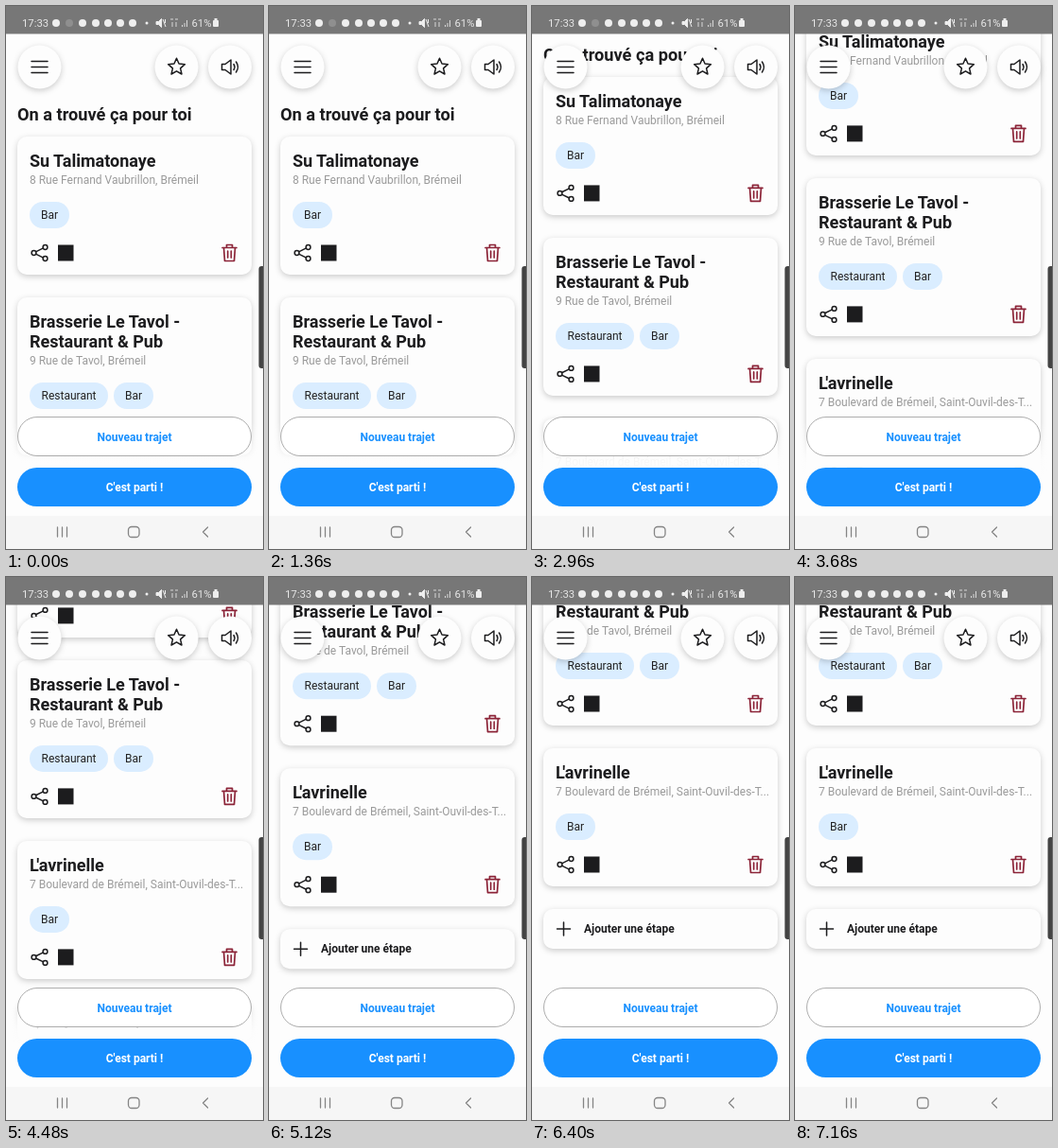
Recreate the animation shown at these times as an HTML page. Size 272 by 574 pixels, loop 7760 ms.

```html
<!DOCTYPE html>
<html lang="fr">
<head>
<meta charset="utf-8">
<style>
  html, body { margin: 0; width: 100%; height: 100%; overflow: hidden; background: #fdfdfd; }
  svg { display: block; width: 100%; height: 100%; font: 12px Roboto, sans-serif; }
  .title { font-size: 18px; font-weight: 700; fill: #1c1c1e; }
  .heading { font-size: 18.2px; }
  .address { fill: #9a9a9a; }
  .bold { font-weight: 700; }
  .raised { fill: #fdfdfd; filter: drop-shadow(0 2.5px 3px #0003); }
  .line { fill: none; stroke: #1c1c1e; stroke-width: 1.5; stroke-linejoin: round; stroke-linecap: round; }
  .trash { stroke: #8c2438; stroke-width: 1.7; }
  .status { font-size: 11.3px; fill: #e6e6e6; }
  .nav { stroke: #858585; stroke-width: 1.3; }
</style>
</head>
<body>
<svg id="stage" viewBox="0 0 272 574"></svg>
<script>
const LOOP = 7760;
const stage = document.getElementById('stage');

const text = (x, y, cls, content, extra = '') =>
  `<text x="${x}" y="${y}" class="${cls}" ${extra}>${content}</text>`;
const box = (x, y, w, h, r, attrs) =>
  `<rect x="${x}" y="${y}" width="${w}" height="${h}" rx="${r}" ${attrs}/>`;
const line = (d, cls = '') => `<path class="line ${cls}" d="${d}"/>`;
const at = (x, y, content) => `<g transform="translate(${x} ${y})">${content}</g>`;
const disc = (x, y, r, attrs) => `<circle cx="${x}" cy="${y}" r="${r}" ${attrs}/>`;

const shareIcon = line('M-3.5-1.4 3.5-4.8M-3.5 1.4 3.5 4.8') +
  [[-6, 0], [6, -6], [6, 6]].map(([x, y]) => disc(x, y, 2.4, 'class="line"')).join('');
const trashIcon = line('M-7.5-5.5H7.5M-3-5.5V-8.5H3V-5.5M-6-5.5-5 8.5H5L6-5.5M-1.8-2V5M1.8-2V5', 'trash');

function chips(labels, y) {
  let x = 25;
  return labels.map(label => {
    const width = label === 'Bar' ? 42 : 83;
    const chip = box(x, y - 14, width, 28, 14, 'fill="#daedff"') +
      text(x + width / 2, y + 4.2, '', label, 'text-anchor="middle" fill="#222"');
    x += width + 6;
    return chip;
  }).join('');
}

function card(top, titles, address, labels) {
  const shift = (titles.length - 1) * 21;
  return at(0, top,
    box(12, 0, 248, 146 + shift, 10, 'class="raised"') +
    titles.map((t, i) => text(25, 32.3 + 21 * i, 'title', t)).join('') +
    text(25, 50 + shift, 'address', address) +
    chips(labels, 83 + shift) +
    at(35.5, 123 + shift, shareIcon) +
    box(55, 114.5 + shift, 16.5, 17, 0, 'fill="#1c1c1e"') +
    at(236.5, 123 + shift, trashIcon));
}

const content =
  text(12, 121.3, 'title heading', 'On a trouvé ça pour toi') +
  card(138, ['Su Talimatonaye'], '8 Rue Fernand Vaubrillon, Brémeil', ['Bar']) +
  card(308, ['Brasserie Le Tavol -', 'Restaurant &amp; Pub'], '9 Rue de Tavol, Brémeil', ['Restaurant', 'Bar']) +
  card(499, ["L'avrinelle"], '7 Boulevard de Brémeil, Saint-Ouvil-des-T...', ['Bar']) +
  box(12, 669, 248, 42, 10, 'class="raised"') +
  line('M26.5 690H40.5M33.5 683V697') +
  text(55, 694.3, 'bold', 'Ajouter une étape', 'fill="#1c1c1e"');

const starPath = 'M' + Array.from({ length: 10 }, (_, i) => {
  const angle = i * Math.PI / 5, radius = i % 2 ? 4.3 : 9.3;
  return `${(radius * Math.sin(angle)).toFixed(2)} ${(-radius * Math.cos(angle)).toFixed(2)}`;
}).join('L') + 'Z';

const roundButton = (x, icon) => at(x, 64.5, disc(0, 0, 23, 'class="raised"') + icon);
const toolbar =
  roundButton(35.5, line('M-8.5-6H8.5M-8.5 0H8.5M-8.5 6H8.5')) +
  roundButton(180.5, line(starPath)) +
  roundButton(237, line('M-8.5-3H-5L1-7.5V7.5L-5 3H-8.5ZM4-3Q6 0 4 3M6.5-5.5Q10.5 0 6.5 5.5'));

const statusBar =
  box(0, 0, 272, 29.5, 0, 'fill="#777"') +
  text(17, 22, 'status', '17:33') +
  [53, 81, 95, 108, 121, 134].map(x => disc(x, 18, 4, 'fill="#eee"')).join('') +
  disc(67, 18, 4, 'id="notice" fill="#eee"') +
  disc(149, 18, 1.5, 'fill="#eee"') +
  '<path d="M159 16.5h2.5l3-3v9l-3-3H159zM166 14l3 8M168.5 14v4" fill="#eee" stroke="#eee"/>' +
  '<path d="M174 14h3M179 14h3M176 17v5M180 22v-5M186.5 22v-2M189 22v-4M191.5 22v-7" stroke="#d8d8d8" fill="none"/>' +
  text(196.5, 22, 'status', '61%') +
  box(219, 15, 6, 7, 1, 'fill="#eee"') + box(220.5, 13, 3, 3, 0, 'fill="#eee"');

// The list fades out behind the two bottom buttons.
const footer =
  `<linearGradient id="fade" x2="0" y2="1">
    <stop stop-color="#fdfdfd" stop-opacity="0"/>
    <stop offset=".4" stop-color="#fdfdfd" stop-opacity=".93"/>
    <stop offset=".6" stop-color="#fdfdfd"/>
  </linearGradient>` +
  box(0, 440, 272, 99, 0, 'fill="url(#fade)"') +
  box(12.5, 434.5, 247, 41, 20.5, 'fill="#fff" stroke="#999" stroke-width=".8"') +
  text(136, 459.5, 'bold', 'Nouveau trajet', 'text-anchor="middle" fill="#1890ff"') +
  box(12, 488, 248, 41, 20.5, 'fill="#1890ff"') +
  text(136, 513, 'bold', "C'est parti !", 'text-anchor="middle" fill="#fff"') +
  box(0, 539, 272, 35, 0, 'fill="#f6f6f6"') +
  line('M54.5 551V561M59.5 551V561M64.5 551V561M213.5 551 208.5 556 213.5 561', 'nav') +
  box(129.5, 550.5, 11.5, 11, 3.5, 'class="line nav"') +
  box(267.5, 275, 8, 108, 3, 'fill="#444"');

stage.innerHTML = `<g id="content">${content}</g>` + toolbar + statusBar + footer;
const scroller = document.getElementById('content');
const notice = document.getElementById('notice');

// Scroll positions by time, joined by smooth Hermite segments.
const stops = [[1680, 0], [2240, 29], [2960, 63], [3680, 126], [4480, 220], [5500, 318]];

function slope(i) {
  if (i === 0 || i === stops.length - 1) return 0;
  const [t0, y0] = stops[i - 1], [t1, y1] = stops[i + 1];
  return (y1 - y0) / (t1 - t0);
}

function scrollAt(time) {
  if (time <= stops[0][0]) return 0;
  const next = stops.findIndex(stop => time < stop[0]);
  if (next < 0) return stops[stops.length - 1][1];
  const [t0, y0] = stops[next - 1], [t1, y1] = stops[next];
  const span = t1 - t0, u = (time - t0) / span, v = 1 - u;
  return y0 * v * v * (1 + 2 * u) + y1 * u * u * (3 - 2 * u) +
    span * u * v * (slope(next - 1) * v - slope(next) * u);
}

function draw(now) {
  const time = now % LOOP;
  scroller.setAttribute('transform', `translate(0 ${-scrollAt(time).toFixed(2)})`);
  notice.setAttribute('opacity', time < 3280 ? 0.2 : 1);
  requestAnimationFrame(() => draw(performance.now()));
}
draw(performance.now());
</script>
</body>
</html>
```
